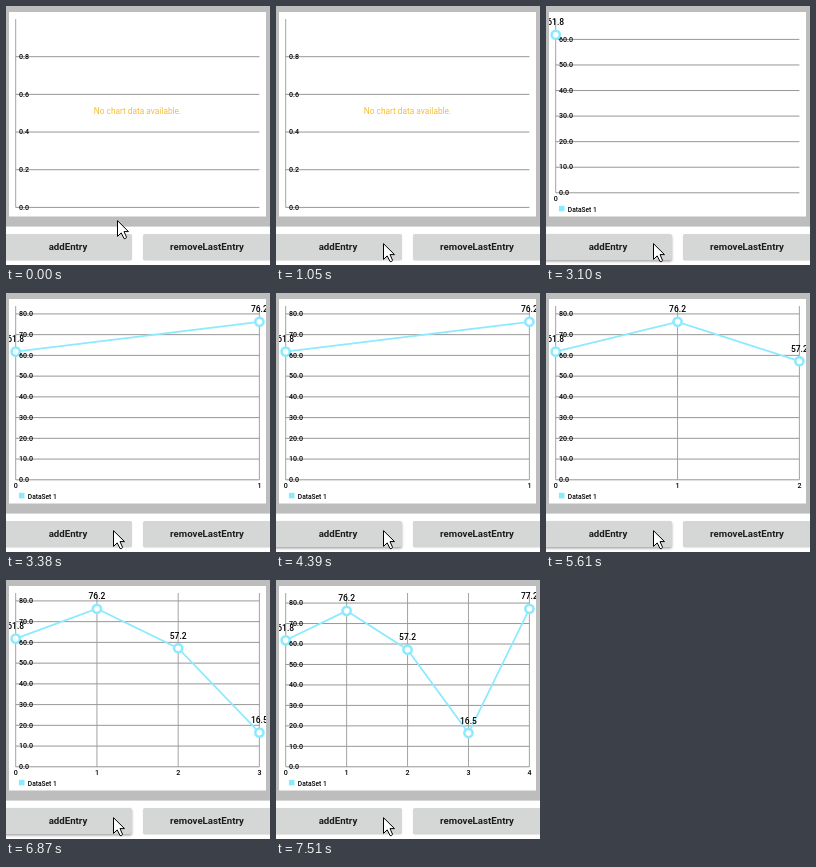
Animation, 264 px wide and 259 px high, one loop 8000 ms. Source, as an HTML page:

```html
<!DOCTYPE html>
<html lang="en">
<head>
<meta charset="utf-8">
<title>Live line chart</title>
<style>
  html, body { margin: 0; width: 100%; height: 100%; overflow: hidden; background: #fff; }
  body { position: relative; font-family: Roboto, "Noto Sans", sans-serif; }
  .panel { position: absolute; left: 0; top: 0; width: 264px; height: 222px; }
  .view { position: absolute; left: 3px; top: 6px; width: 257px; height: 205px; overflow: hidden; }
  .film { animation: film 8s step-end infinite; }
  .film svg { display: block; width: 257px; height: 205px; }

  .grid { stroke: #8c8c8c; stroke-width: .9; fill: none; }
  .axis { stroke: #999; stroke-width: .9; fill: none; }
  .line { stroke: #8ceaff; stroke-width: 1.75; fill: none; }
  .dot { stroke: #8ceaff; stroke-width: 2.6; fill: #fff; }
  .form { fill: #8ceaff; }
  .label { font-size: 7.1px; font-weight: 500; }
  .legend { font-size: 6.65px; font-weight: 500; }
  .value { font-size: 8.5px; font-weight: 500; }
  .empty { font-size: 8.33px; fill: #f7bd33; }
  .mid { text-anchor: middle; }

  .button {
    position: absolute; top: 228px; width: 128px; height: 26px; border-radius: 2px;
    background: #d5d7d6; color: #1c1c1c; font-size: 9.68px; font-weight: 700;
    line-height: 26px; text-align: center; box-shadow: 0 .5px 1px rgba(0, 0, 0, .2);
  }
  .add { left: -2px; animation: press 8s step-end infinite; }
  .remove { left: 137px; }
  .cursor {
    position: absolute; left: 0; top: 0; width: 13px; height: 20px;
    animation: cursor 8s step-end infinite;
  }

  @keyframes film {
    0% { transform: translateY(0); }
    23.75% { transform: translateY(-205px); }
    40.375% { transform: translateY(-410px); }
    56.375% { transform: translateY(-615px); }
    72% { transform: translateY(-820px); }
    87.5%, 100% { transform: translateY(-1025px); }
  }
  @keyframes press {
    0%, 23.75%, 42.25%, 56.375%, 72%, 89%, 100% { box-shadow: 0 .5px 1px rgba(0, 0, 0, .2); }
    21.875%, 38.75%, 54.875%, 70.125%, 85.875% { box-shadow: 0 1.5px 2.5px rgba(0, 0, 0, .36); }
  }
  @keyframes cursor {
    0% { transform: translate(111px, 214px); }
    6.25% { transform: translate(111px, 215px); }
    8.125% { transform: translate(110px, 223px); }
    9.625% { transform: translate(109px, 232px); }
    11.5% { transform: translate(108px, 236px); }
    13.125%, 100% { transform: translate(107px, 237px); }
  }
</style>
</head>
<body>
<svg class="panel" viewBox="0 0 264 222">
  <rect width="264" height="220.6" fill="#bdbdbd"/>
  <rect x="3" y="6" width="257" height="204.5" fill="#fff"/>
</svg>
<div class="view"><div class="film"></div></div>
<div class="button add">addEntry</div>
<div class="button remove">removeLastEntry</div>
<svg class="cursor" viewBox="0 0 13 20">
  <path d="M.5 .7V16.4L4.2 12.9 7.1 18.6H8.6L9.5 17.2 7 11.6H11.5Z" fill="#fff" stroke="#000"/>
</svg>
<script>
  const entries = [61.8, 76.2, 57.2, 16.5, 77.2];
  const left = 9.7, right = 253.4, ceiling = 13;

  const text = (x, y, cls, str) => `<text x="${x}" y="${y}" class="${cls}">${str}</text>`;
  const path = (d, cls) => `<path d="${d}" class="${cls}"/>`;

  function chart(values) {
    const n = values.length;
    const bottom = n ? 186.8 : 201.4;
    const max = n ? Math.max(...values) * 1.1 : 1;
    const step = n ? 10 : 0.2;
    const yOf = v => bottom - v / max * (bottom - ceiling);
    const xOf = i => left + (n > 1 ? i / (n - 1) : 0) * (right - left);
    const upright = x => path(`M${x} ${ceiling}V${bottom}`, "axis");

    let grid = upright(left), labels = "", data = "", marks = "";
    for (let k = 0; k * step < max - 0.01; k++) {
      const y = yOf(k * step);
      grid += path(`M${left} ${y}H${right}`, "grid");
      labels += text(12.9, y + 2.2, "label", (k * step).toFixed(1));
    }
    if (!n) return grid + labels + text(131.5, 108.3, "empty mid", "No chart data available.");

    const points = values.map((v, i) => [xOf(i), yOf(v)]);
    data = path("M" + points.join("L"), "line");
    points.forEach(([x, y], i) => {
      if (i) grid += upright(x);
      data += `<circle cx="${x}" cy="${y}" r="4.1" class="dot"/>`;
      labels += text(x, 194.9, "label mid", i);
      marks += text(x, y - 9.4, "value mid", values[i].toFixed(1));
    });
    const legend = '<rect x="12.9" y="199.8" width="5.6" height="5.6" class="form"/>'
      + text(21.8, 206.2, "legend", "DataSet 1");
    return grid + data + labels + marks + legend;
  }

  let film = "";
  for (let n = 0; n <= entries.length; n++) {
    film += `<svg viewBox="3 6 257 205">${chart(entries.slice(0, n))}</svg>`;
  }
  document.querySelector(".film").innerHTML = film;
</script>
</body>
</html>
```
